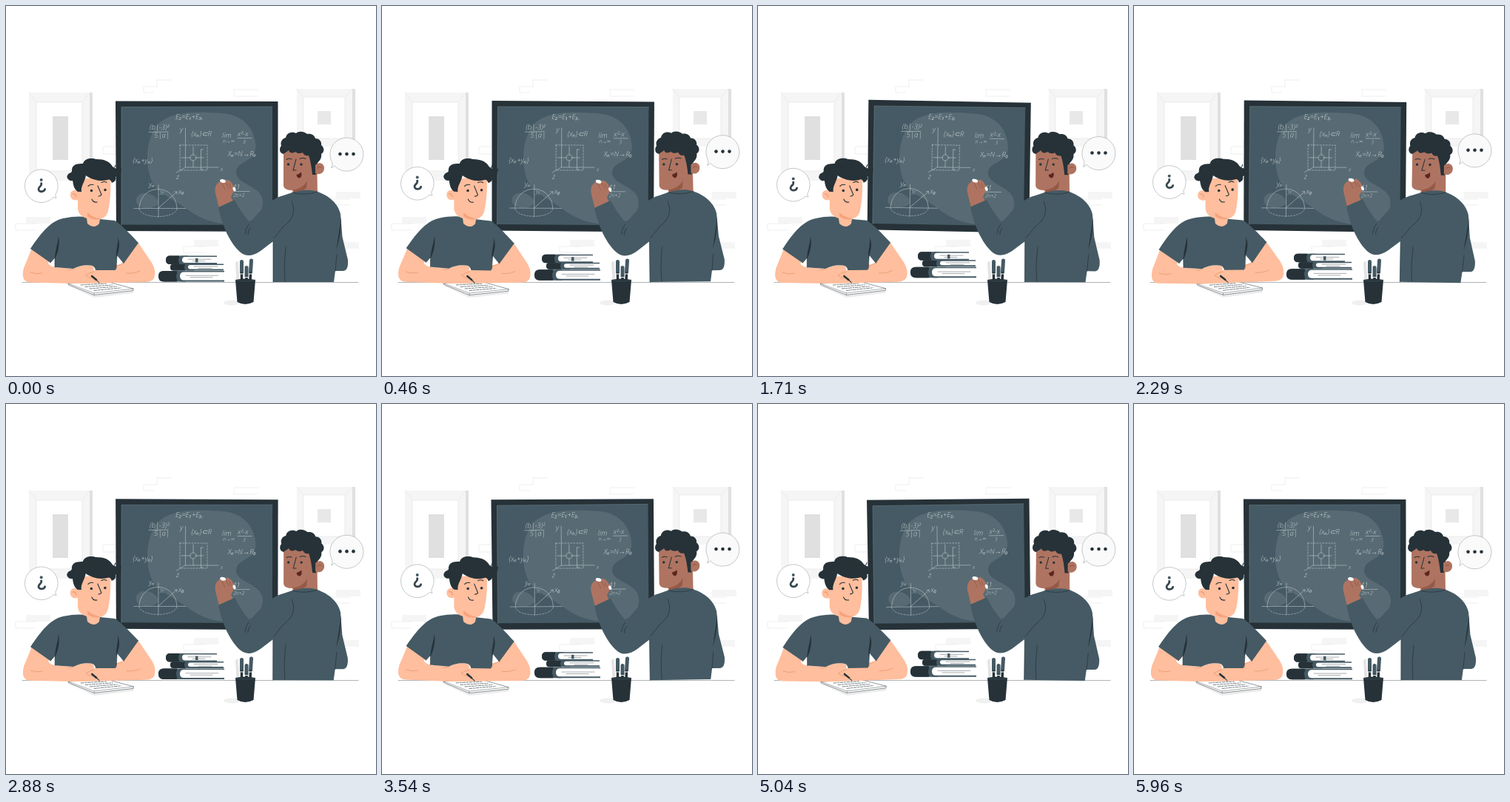
Animation of 500 by 500 pixels, one loop 6000 ms. Source, as an HTML page:

```html
<!DOCTYPE html>
<html lang="en">
<head>
<meta charset="utf-8">
<title>Maths lesson</title>
<style>
html, body { margin: 0; width: 100%; height: 100%; overflow: hidden; background: #fff }
svg { display: block; width: 100vw; height: 100vh }
.ln { fill: none; stroke-linecap: round; stroke-linejoin: round }
.ink { fill: #263238 }
.slate { fill: #455a64 }
.dark { stroke: #263238 }
.skin { fill: #ffbe9d }
.tan { fill: #ae7461 }
.chalk { stroke: #c9d0d3; stroke-width: .55 }
#notes { fill: #c9d0d3; font: italic 300 9.5px "Open Sans", "Noto Sans", sans-serif }
#notes .s { font-size: 7px }
</style>
</head>
<body>
<svg viewBox="0 0 500 500">

<!-- wall -->
<g fill="#f5f5f5">
  <path fill="#e0e0e0" d="M113 117h4v119h-4zM468 112h4v78h-4z"/>
  <path d="M31 117h82v119H31zM393 112h75v78h-75z"/>
  <path class="ln" stroke="#e6e6e6" stroke-width=".7" d="M31 117l10 13M113 117l-10 13M393 112l9 11M468 112l-10 11"/>
  <path fill="#fff" stroke="#e6e6e6" stroke-width=".7" d="M41 130h62v93H41zM402 123h56v56h-56z"/>
  <path fill="#e0e0e0" d="M63 149h21v59H63z"/>
  <path fill="#e8e8e8" d="M421 142h18v18h-18z"/>
  <path d="M446 251h33v9h-33zM452 319h25v9h-25zM27 285h33v9H27zM254 316h33v9h-33z"/>
  <path class="ln" stroke="#ebebeb" stroke-width=".8" d="M223 100h-19v9M204 109h-18v8h14M341 113h-33v9h32M148 190h-17v10h17M465 261h-32v8h32M42 294H13v9h26M270 325h-30v8h28"/>
</g>

<!-- blackboard -->
<g id="board">
  <path class="ink" d="M148 128.500L367.500 129V305L149 304z"/>
  <path class="slate" d="M156 136.500l204-.5v160l-204-.5z"/>
  <path class="ln" stroke="#6b7d86" stroke-width=".6" d="M156 296V136.500l204-.5"/>
  <g fill="#fff" opacity=".1">
    <path d="M208 157C228 141 262 143 292 145C324 147 337 170 337.500 190C337 212 313 208 311 224C310 242 347 242 347 265C347 286 328 295 305 295C278 294 262 287 244 274C228 262 207 254 199 240C188 222 186 178 208 157z"/>
    <path d="M176 262c1-11 16-10 21-7c7 4 12 10 6 15c-8 5-28 5-27-8z"/>
  </g>
  <g class="ln chalk">
    <path d="M193 170.500l26-.5M313 178.500h19M308 250.500h21"/>
    <path d="M242.500 165V218H287M242.500 218l-12 7M253 190v11M253 209v9M263.500 194v27M263.500 194h3M263.500 221h3M237 205h12M257 205h10"/>
    <circle cx="253" cy="205" r="4"/>
    <path stroke-dasharray="2 2" d="M235 188h37v34h-37z"/>
    <path d="M173 273.500h70M206 242v43M180 273C182 239 229 239 231 273M206 273l25-22M228 251h3v3"/>
    <path stroke-dasharray="2 2" d="M180 274c3 14 48 14 51 0"/>
  </g>
  <g id="notes"></g>
</g>

<path class="ln" stroke="#8d969a" stroke-width=".7" d="M22 373.500H476"/>

<!-- teacher -->
<g id="teacher">
  <path class="tan" d="M375 194L375 243Q376 249 387 249L389 258H421L420 195z"/>
  <path fill="#955947" d="M388 248.500Q401 247 407 236L406 246Q399 252 389 252z"/>
  <path class="ink" d="M375 200c-6-1-6-8-3-11c-2-6 2-10 6-11c1-7 9-9 14-6c4-4 12-2 15 1c6-1 10 2 11 6c6 0 9 5 8 9c5 4 4 10 0 12c1 5-2 9-5 12l-2 16h-5c-1-9-2-18-5-26c-4 1-7-1-8-4c-4 2-8 1-10-1c-5 3-8 1-9-2c-2 2-5 3-7 5z"/>
  <path class="tan" d="M418 215c4-5 12-3 12 4c0 7-7 10-12 7z"/>
  <g class="ln dark" stroke-width="1">
    <path d="M379 207.500q3-2 7-.5M397 206.500q4-2 8 0M392 207l-4 15h4"/>
    <path stroke="#955947" d="M421 219q2-3 5-1"/>
  </g>
  <circle class="ink" cx="381.500" cy="214" r="1.700"/>
  <circle class="ink" cx="399" cy="214" r="1.700"/>
  <path fill="#5b2620" d="M392.500 228q4-1 6.500-3.500q1.500 6-2 8q-4 0-4.500-4.500z"/>
  <path class="tan" d="M288 273L283 253C281 243 286 238 291 237L300 235C306 238 309 244 308 250L304 258L308 266z"/>
  <path class="ln" stroke="#8f5a49" stroke-width=".8" d="M292 240l4 8M297 238l4 8M302 240l2 6"/>
  <ellipse cx="293" cy="236.500" rx="4" ry="2.300" fill="#fff" transform="rotate(15 293 236.500)"/>
  <ellipse cx="308.500" cy="247.500" rx="1.800" ry="3" fill="#fff" transform="rotate(-20 308.500 247.500)"/>
  <path class="slate" d="M387 252C398 249 411 247 421 251C436 256 449 267 452 281L454.500 312L462 343Q463 357 456 358H445L443 373H361V318L344 331Q328 342 317 333C303 321 292 297 287 272L309 262Q318 280 330 293C348 270 362 259 375 256z"/>
  <g class="ln dark" stroke-width=".7">
    <path d="M387 252q17 5 34-1M386 264c6 13 2 24-11 34l-13 16M378 326q-3 24-1 46M361 318v55M323 308q1-8 5-13M327 309q0-6 3-9"/>
    <path class="ink" stroke="none" d="M452.500 285c1 16-2 30-6 44c2-15 5-30 6-44z"/>
    <path d="M445 358l2-22"/>
  </g>
</g>

<g id="books"></g>

<!-- pencil cup -->
<ellipse cx="305" cy="401" rx="11" ry="3.500" fill="#f0f0f0"/>
<g class="ln">
  <path stroke="#e4e4e4" stroke-width="4" d="M312 347l1.500 26"/>
  <path stroke="#455a64" stroke-width="5" d="M318.500 345.500v15M325 353.500v12M331.500 344l-1 16"/>
  <path stroke="#263238" stroke-width="3.500" d="M318.500 361v11M325 366v6M330.500 361l-.5 11"/>
  <path stroke="#fff" stroke-width="1" d="M316.500 362h4.500M323 366.500h4M328.500 362h4.500M315.500 368v3M322 368v3M327.500 368v3"/>
</g>
<path class="ink" d="M310 370Q323 367 337 370L334.500 400Q323 406 312.500 400z"/>
<path class="ln" stroke="#455a64" stroke-width=".6" d="M310.500 370.500q13 3 26 0"/>

<!-- student -->
<g id="student">
  <path fill="#ebebeb" d="M84 378l35 16l53-6v-5z"/>
  <path fill="#fff" class="dark" stroke-width=".5" stroke-linejoin="round" d="M84 375l51-3l37 10v2.500l-53 6l-35-14z"/>
  <path class="ln dark" stroke-width=".4" d="M84 375l35 13l53-6M119 388v2.500"/>
  <path class="ln dark" stroke-width=".6" stroke-dasharray="4 1.500 2 1.500" d="M101 377l35-2M107 379.500l37-2.500M113 382l37-3M119 384.500l36-3.500"/>
  <path class="skin" d="M178 319L197 347Q204 359 200 368Q197 373 188 373L105 375V359L121 357L158 348L152 330z"/>
  <path class="skin" d="M36 325L24 354Q19 374 34 373.500L88 375H108Q119 374 120 368Q112 368 108 364L118 358Q121 352 114 350.500Q102 349 91 355L66 353Q60 352 57 348L64 332z"/>
  <g class="ln" stroke="#e89a72" stroke-width=".8">
    <path d="M91 355q-5 2-7 2M108 364q5-4 11-5M108 364q4 4 11 4M160 347l-12 5M163 361q10 1 18-3M33 360q8 3 16 1"/>
  </g>
  <path class="ln dark" stroke-width="2.500" d="M116 365l6 5"/>
  <path class="ln dark" stroke-width="1" d="M122 370l4 4"/>
  <path class="slate" d="M77 287C90 284 101 284 109 285C113 298 121 299 127 288L147 290C153 293 166 306 179 320L159 348L150 337L149 353L148 357L121 357Q120 351 114 350.500Q102 349 91 355L66 353V340L60 347L33 328C44 312 58 291 77 287z"/>
  <path class="ink" d="M71 311c2 12-1 23-5 31c0-11 4-20 5-31zM151 313c4 9 1 19-2 28c-1-10 3-19 2-28z"/>
  <path class="ln dark" stroke-width=".6" d="M66 340v13M150 337l-1 18M60 347l6-7"/>
  <path class="skin" d="M98 234L141 230C142 247 141 263 138 277Q136 286 127 288L126 294Q119 302 110 294L109 287Q98 284 97 274V262C90 264 86 259 87 254C88 248 95 248 98 251z"/>
  <path fill="#f5a37d" d="M110 279q7 7 17 8v1q-10 2-17-4z"/>
  <path class="ink" d="M97 251C91 247 91 240 90 236C85 237 81 232 83 229C85 224 90 227 89 221C90 213 98 213 104 213C106 205 117 205 122 207C133 207 140 210 144 217Q149 222 156 219Q157 226 148 231Q150 236 143 239Q141 233 137 235C126 238 115 234 108 229C106 239 101 243 102 251z"/>
  <path class="ln ink" d="M145 221q5-6 3-7M147 229q7-1 9-4"/>
  <g class="ln dark" stroke-width="1.100">
    <path d="M111 243.500q3-3 7-2M129 238.500q4-2 7 0M124 243l5 12q-1 2-4 2M116 261q2 5 7 4"/>
    <path stroke="#e89a72" d="M90 254q4-1 5 4"/>
  </g>
  <circle class="ink" cx="115.500" cy="249.500" r="1.800"/>
  <circle class="ink" cx="134" cy="248.500" r="1.800"/>
</g>

<!-- speech bubbles -->
<g id="bubbles" class="ink">
  <path stroke="#9aa3a7" style="fill:#fff" stroke-width=".6" d="M68 259.500L64 258.500A22.300 22.300 0 1 1 67 254.500Q66.500 257 68 259.500z"/>
  <circle class="slate" cx="47.700" cy="235" r="2"/>
  <path class="ln" stroke="#37474f" style="stroke-linecap:butt" stroke-width="2.800" d="M47.700 238.500v2.500C47.700 244 44 244 44 247.500C44.200 252 52.300 252 52.800 246.500"/>
  <path stroke="#9aa3a7" style="fill:#fafafa" stroke-width=".6" d="M439.500 219L444 216A22.500 22.500 0 1 0 441 212Q441 216 439.500 219z"/>
  <circle cx="451.500" cy="200" r="2.300"/>
  <circle cx="460.500" cy="200" r="2.300"/>
  <circle cx="469.500" cy="200" r="2.300"/>
</g>
</svg>

<script>
const $ = id => document.getElementById(id);

// [text, x, y, small]
const notes = [
  ["E₂=E₁+E₃,", 229, 153], ["(b|-3)²", 194, 167], ["5|a|", 200, 178],
  ["y", 235, 170], ["{xₙ}⊂R", 250, 176], ["lim", 292, 178],
  ["n→∞", 293, 185, 1], ["x²-x", 313, 176], ["3", 320, 186, 1],
  ["Xₙ=N→R₀", 300, 203], ["{xₙ+yₙ}", 171, 212], ["x", 290, 223, 1],
  ["z", 230, 234], ["yₙ", 193, 244], ["x₀", 233, 254],
  ["3c", 207, 255, 1], ["41", 306, 248], ["2n+2", 307, 258, 1]
];
$("notes").innerHTML = notes.map(([text, x, y, small]) =>
  `<text x="${x}" y="${y}"${small ? ' class="s"' : ""}>${text}</text>`).join("");

// [left, top, right, bottom, page start]
const books = [[206, 358, 295, 372.5, 235], [222, 348.5, 294, 357.5, 246], [216, 337.5, 285, 349, 238]];
$("books").innerHTML = books.map(([l, t, r, b, p]) => {
  const h = b - t, m = t + h / 2;
  const spine = (x, end, y, tall) =>
    `M${end} ${y}H${x + tall / 2}Q${x} ${y} ${x} ${y + tall / 2}T${x + tall / 2} ${y + tall}H${end}z`;
  return `<path class="slate" d="${spine(l, r, t, h)}"/>
    <path class="ink" d="${spine(l, p - 4, t, h)}"/>
    <path class="slate" d="${spine(p - 5, p + 8, t, h)}"/>
    <path fill="#fff" d="${spine(p, r, t + 1.5, h - 3.5)}"/>
    <path class="ln dark" stroke-width=".4" d="M${p + 8} ${m - 1}H${r - 8}M${p + 14} ${m + 1.5}H${r - 16}"/>`;
}).join("") + '<path class="slate" d="M256 341h3.500v5.500h-3.500z"/>';

// Linear swing: 0 → 1 → 0 → -1 → 0 over one period
const swing = (t, period) => {
  const p = t / period % 1;
  return p < .25 ? 4 * p : p < .75 ? 2 - 4 * p : 4 * p - 4;
};
// Linear rise and fall: 0 → 1 → 0 over one period
const rise = (t, period) => 1 - Math.abs(1 - 2 * t / period % 2);
const move = (id, transform) => $(id).setAttribute("transform", transform);

function draw() {
  const t = performance.now() % 6000;
  const sway = swing(t, 3000);
  move("board", `rotate(${swing(t, 6000)} 258 217)`);
  move("student", `rotate(${sway} 112 297)`);
  move("teacher", `rotate(${-sway} 372 272)`);
  move("bubbles", `translate(0 ${-5.5 * rise(t, 1500)})`);
  move("books", `translate(0 ${-6 * rise(t, 3000)})`);
  requestAnimationFrame(draw);
}
draw();
</script>
</body>
</html>
```
